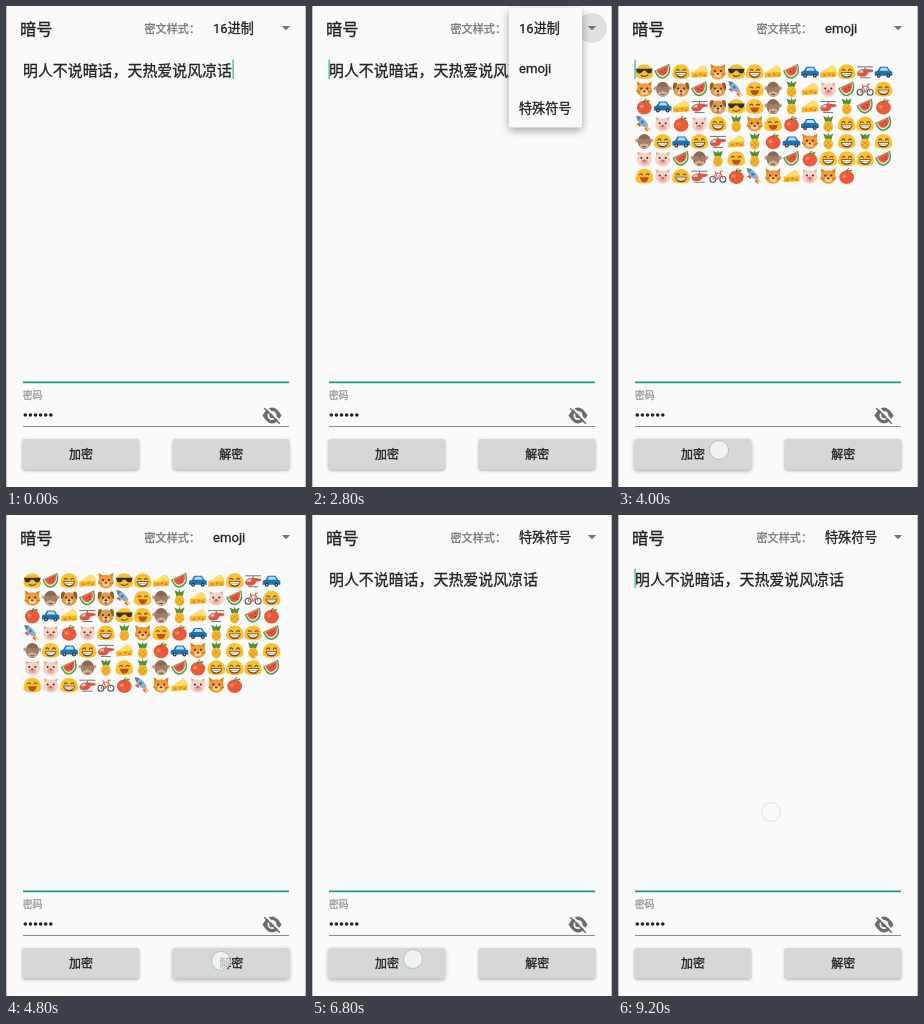
An HTML page with a canvas that plays this animation: 300 px wide and 481 px high, repeating every 9.4 s.

```html
<!DOCTYPE html>
<html lang="zh-CN">
<head>
<meta charset="utf-8">
<style>
html, body { margin: 0; width: 100%; height: 100%; overflow: hidden; background: #f9faf9; }
canvas { display: block; }
</style>
</head>
<body>
<canvas id="stage" width="300" height="481"></canvas>
<script>
const g = document.getElementById('stage').getContext('2d');
const LOOP = 9400, FONT = 'Roboto, "Noto Sans CJK SC", "Noto Sans CJK JP", sans-serif';
const LEFT = 17, LINE = 17.4, PAPER = '#f9faf9', TEAL = '#159a87';

const PLAIN = ['明人不说暗话，天热爱说风凉话'];
const HEX = [
  '3A1B530BACB0FC564A4E269B7AD08C',
  'BF44326FB9A8E7871952FC11E861C0F',
  'B38C599F07A169292A6011A270FD8E5',
  'B758'
];
// One letter per emoji, see `emoji` below
const EMOJI = [
  'owgckogcwvcghv', 'kmdwdrsmfcpwbg', 'avchdosmfchfwa', 'rpapgfksavfggw',
  'mgvghcfavkfgfg', 'ppwmfsfmwagggw', 'spghbarkcpka'
];
const GLYPHS = '☆★○●◎◇◆□■△▲▽▼※〓¤';
const noise = i => Math.abs(Math.sin(i * 12.9898 + 4) * 43758.5453) % 1;
const SYMBOLS = Array.from({ length: 6 }, (_, row) =>
  Array.from({ length: row < 5 ? 17 : 11 }, (_, col) =>
    GLYPHS[Math.floor(noise(row * 17 + col) * GLYPHS.length)]).join(''));

const STYLES = ['16进制', 'emoji', '特殊符号'];
const ENCRYPT = [101, 444], DECRYPT = [215, 446], SPINNER = [266, 16];

// [time, content] and [time, [x, y]]
const contents = [[0, PLAIN], [1200, HEX], [1800, PLAIN], [4000, EMOJI], [5000, PLAIN], [7000, SYMBOLS], [8800, PLAIN]];
const taps = [
  [800, ENCRYPT], [1400, DECRYPT],
  [2200, SPINNER], [2900, [232, 62]], [3600, ENCRYPT], [4600, DECRYPT],
  [5400, SPINNER], [6000, [232, 102]], [6600, ENCRYPT], [8300, DECRYPT],
  [8700, [153, 297]]
];
const menus = [[2600, 3300], [5800, 6400]];

// The thin outline gives the slightly heavy strokes of the phone's font
function text(str, x, y, size, color = '#222', align = 'left') {
  g.font = `${size}px ${FONT}`;
  g.fillStyle = g.strokeStyle = color;
  g.lineWidth = .3;
  g.textAlign = align;
  g.fillText(str, x, y);
  g.strokeText(str, x, y);
}
function disc(x, y, r, color, ry = r) {
  g.fillStyle = color;
  g.beginPath();
  g.ellipse(x, y, r, ry, 0, 0, 7);
  g.fill();
}
function shape(path, color) {
  g.fillStyle = color;
  g.fill(new Path2D(path));
}
function line(path, color, width = 1) {
  g.strokeStyle = color;
  g.lineWidth = width;
  g.stroke(new Path2D(path));
}
function rect(x, y, w, h, color) {
  g.fillStyle = color;
  g.fillRect(x, y, w, h);
}
function card(x, y, w, h, color, blur, drop, alpha) {
  g.save();
  g.shadowColor = `rgba(0,0,0,${alpha})`;
  g.shadowBlur = blur;
  g.shadowOffsetY = drop;
  g.fillStyle = color;
  g.beginPath();
  g.roundRect(x, y, w, h, 2);
  g.fill();
  g.restore();
}

function face() {
  shape('M-8.8 3Q-8.5-7.5 0-7.5T8.8 3Q8.5 7.3 0 7.3T-8.8 3', '#fbc02d');
}
function happyEyes() {
  line('M-5-1Q-3.3-4-1.6-1M1.6-1Q3.3-4 5-1', '#5d4037', 1.1);
}
function head(color, muzzle, nose) {
  disc(0, 0.8, 7.6, color, 6.8);
  disc(0, 3, 3.6, muzzle, 2.6);
  for (const x of [-3, 3]) disc(x, -0.7, 1, '#3e2723');
  disc(0, 2, 1.4, nose, 1);
}
const emoji = {
  s() { face(); happyEyes(); shape('M-4.5 1H4.5Q3.5 6 0 6T-4.5 1', '#b5541f'); },
  g() {
    face(); happyEyes();
    shape('M-6 .5H6Q5 6 0 6T-6 .5', '#6d4423');
    shape('M-5 1.3H5Q4 4.6 0 4.6T-5 1.3', '#fff');
    line('M-5 2.8H5', '#8d7a60', .6);
  },
  o() {
    face();
    shape('M-8.5-3H8.5L7 1Q4 3 1-1H-1Q-4 3-7 1Z', '#333');
    line('M-3.5 3.5Q0 6 4 3', '#6d4423', 1.1);
  },
  k() {
    shape('M-7.5-8L-1-4-6 2ZM7.5-8L1-4 6 2Z', '#dd7f22');
    head('#f39a33', '#ffcf8f', '#5d4037');
    line('M-8 2L-4 3M8 2L4 3', '#a65f1c', .7);
  },
  d() {
    head('#dc9a4b', '#f3cf9a', '#3e2723');
    shape('M-4-6Q-9-9-8 1Q-5 0-4-6ZM4-6Q9-9 8 1Q5 0 4-6Z', '#9a5a24');
    disc(0, 5, 1.3, '#e5533d');
  },
  p() {
    shape('M-7-7L-2-5-6-1ZM7-7L2-5 6-1Z', '#e8aaa0');
    head('#f7d3c6', '#efa9a0', '#b3605f');
  },
  m() {
    for (const x of [-7, 7]) disc(x, -1, 2, '#c9a58a');
    disc(0, 0, 6.5, '#8a6a55', 7.5);
    disc(0, 4, 4.6, '#d7b08b', 3);
    for (const x of [-3.2, 3.2]) disc(x, 0, 3.2, '#a17f68', 2.8);
    line('M-2 5Q0 6.2 2 5', '#5d4037');
  },
  w() {
    shape('M-8.5-1L6.5-8Q10 2 3 6T-8.5-1', '#4f9b45');
    shape('M-7-1L5.5-7Q8 1 2.5 4.5T-7-1', '#dcedc8');
    shape('M-6-1.3L5-6.5Q6.5 0 2 3T-6-1.3', '#e95743');
    for (const [x, y] of [[-1, 0], [2, -2], [2.5, 1]]) disc(x, y, .6, '#4e2a22');
  },
  c() {
    shape('M-8 1L3-6Q8-5 8 0V5L-8 6Z', '#f9b42a');
    shape('M-8 1L3-6Q8-5 8 0Z', '#ffdf6b');
    for (const [x, y] of [[-4, 3.5], [1, 2.5], [5, 3.5]]) disc(x, y, 1.2, '#d98b17');
  },
  v() {
    shape('M-8.8 4V0L-6-1-3.5-5H4L6.5-1 8.8 0V4Z', '#1e73b5');
    shape('M-4-1L-2.5-4H3.2L5-1Z', '#b3dcf2');
    for (const x of [-4.8, 4.8]) { disc(x, 4, 2, '#333'); disc(x, 4, .8, '#ccc'); }
  },
  h() {
    line('M-8-5H8M0-5V-2M-5 6H5', '#607d8b', 1);
    shape('M-8 1Q-6-3 0-3L8-2V0L3 1Q2 5-3 5T-8 1', '#e5533d');
    shape('M-7 1Q-5-2-2-2V1Z', '#b3dcf2');
  },
  a() {
    disc(0, 1, 7.4, '#ea5a3a', 6.8);
    disc(-2.5, 0, 2.2, '#f58a5a', 1.8);
    line('M0-4Q0-7 2-8', '#6d4423', 1);
    shape('M0-5Q3-8 6-6Q4-3 0-5', '#6b9e35');
  },
  f() {
    shape('M-5-8L-1-6 0-9 1-6 5-8 3-2H-3Z', '#4f8f3a');
    disc(0, 2.5, 4.8, '#f8bc30', 5.5);
    line('M-3-1L4 5M-4 2L1 7M3-1L-4 5M4 2L-1 7', '#d08a1c', .7);
  },
  r() {
    shape('M-3-2L-8 0-4 3ZM2 3L4 8 0 5Z', '#d9583b');
    shape('M-8-8Q-1-8 4 1L2 4Q-7 1-8-8Z', '#8fb0c4');
    shape('M-8-8L-3-7-6-3Z', '#4a86ad');
    disc(-2, -2, 1.5, '#2f7fb8');
    shape('M3 2L7 7 1 4Z', '#fbb034');
  },
  b() {
    line('M-8 3A3 3 0 1 0-2 3A3 3 0 1 0-8 3M2 3A3 3 0 1 0 8 3A3 3 0 1 0 2 3', '#455a64', 1.1);
    line('M-5 3L-2-3H3L0 3H-5M0 3L-3-5M5 3L2-5H5', '#d9604f', 1);
  }
};

function drawContent(content) {
  content.forEach((row, i) => {
    if (content !== EMOJI) return text(row, LEFT, 70 + i * LINE, 14.93);
    [...row].forEach((key, j) => {
      g.save();
      g.translate(26.3 + j * 18.4, 65.8 + i * LINE);
      emoji[key]();
      g.restore();
    });
  });
}

function drawButton(label, x, pressed) {
  card(x, 433, 116.5, 30.5, '#d5d8d7', pressed ? 4 : 3, pressed ? 1.6 : 1, .32);
  text(label, x + 58.5, 452.5, 12, '#222', 'center');
}

function drawEye() {
  shape('M256.5 409.5Q266 393.5 275.5 409.5Q266 425.5 256.5 409.5Z', '#6b6b6b');
  disc(266, 409.5, 4.5, PAPER);
  disc(266, 409.5, 2.7, '#6b6b6b');
  line('M260 401L276 417', PAPER, 1.8);
  line('M258.2 402.2L273.8 417.8', '#6b6b6b', 1.6);
}

function drawMenu() {
  card(197, 2, 73, 119.5, '#fafafa', 8, 3, .35);
  STYLES.forEach((name, i) => text(name, 207, 27 + i * 40, 13.1));
}

function drawTap(age, [x, y]) {
  g.globalAlpha = Math.min(1, (600 - age) / 200);
  disc(x, y, 9.5, 'rgba(250,251,253,.72)');
  g.strokeStyle = 'rgba(150,160,172,.55)';
  g.lineWidth = 1;
  g.stroke();
  g.globalAlpha = 1;
}

function draw(t) {
  const [since, content] = contents.findLast(([at]) => t >= at);
  const menuOpen = menus.some(([from, to]) => t >= from && t < to);
  const style = STYLES[menus.filter(([, to]) => t >= to).length];
  const pressed = spot => taps.some(([at, p]) => p === spot && t >= at + 100 && t < at + 500);

  rect(0, 0, 300, 481, PAPER);
  rect(0, 0, 1, 481, '#bfc1c0');
  rect(299, 0, 1, 481, '#bfc1c0');

  text('暗号', 14, 29, 16.3);
  text('密文样式：', 138.5, 27, 11.1, '#777');
  text(style, 207, 27, 13.1);
  if (menuOpen) disc(280, 22, 15, '#dedfde');
  shape('M275.8 20H284.2L280 24.3Z', '#757575');

  drawContent(content);
  if ((t - since) % 1000 < 500) rect(since ? LEFT - .5 : 226.5, 53.5, 1.2, 19.5, '#3aab9b');

  rect(LEFT, 375.5, 266, 1.7, TEAL);
  text('密码', LEFT, 392.5, 9.7, '#999');
  for (let i = 0; i < 6; i++) disc(19.3 + i * 5.1, 409, 1.8, '#222');
  rect(LEFT, 420, 266, 1, '#8c8c8c');
  drawEye();
  drawButton('加密', 16.5, pressed(ENCRYPT));
  drawButton('解密', 166.8, pressed(DECRYPT));

  if (menuOpen) drawMenu();
  for (const [at, spot] of taps) if (t >= at && t < at + 600) drawTap(t - at, spot);
}

const start = performance.now();
function tick() {
  draw((performance.now() - start) % LOOP);
  requestAnimationFrame(tick);
}
tick();
</script>
</body>
</html>
```
